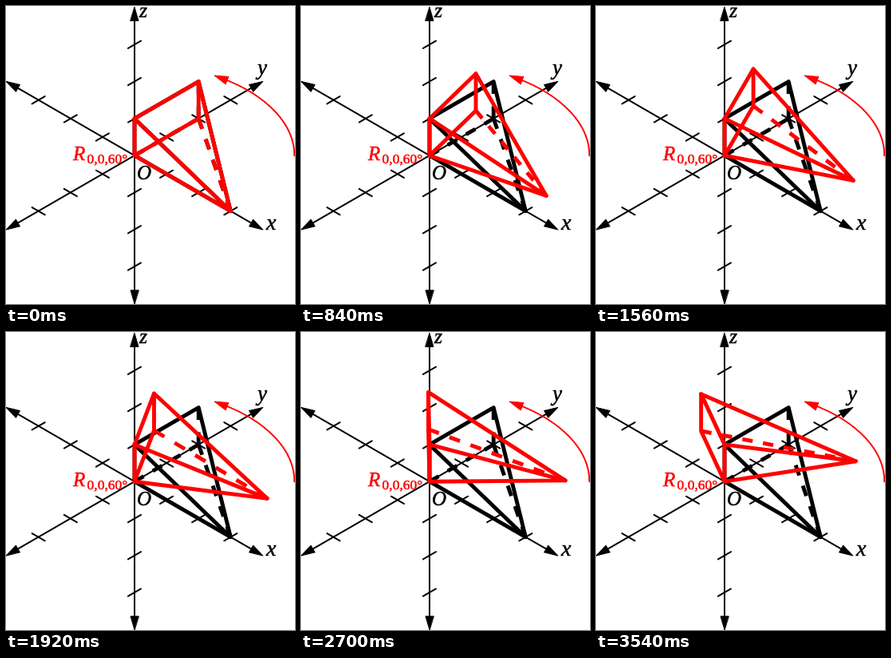
Animation of 362x373 px, one loop 7200 ms. Source, as an HTML page with a canvas:

```html
<!DOCTYPE html>
<html lang="en">
<head>
<meta charset="utf-8">
<style>
html, body { margin: 0; width: 100%; height: 100%; overflow: hidden; background: #fff; }
canvas { display: block; }
</style>
</head>
<body>
<canvas width="362" height="373"></canvas>
<script>
const g = document.querySelector('canvas').getContext('2d');
const LOOP = 7200, STEP = 60, LAST = 59;
const CX = 161, CY = 187.2, UX = 40.1, UY = 23.15, UZ = 46.3;
const RED = '#f00', BLACK = '#000', THIN = 2, THICK = 4.9, DASH = 13.8;
const SERIF = '"Liberation Serif", "Noto Serif", serif';

// isometric projection of a point in space
const project = ([x, y, z]) => [CX + UX * (x + y), CY + UY * (x - y) - UZ * z];

function stroke(points, color, width) {
  g.strokeStyle = color;
  g.lineWidth = width;
  g.beginPath();
  points.forEach(p => g.lineTo(...p));
  g.stroke();
}

// dashes are fitted so that the line begins and ends with a full one
function dashed(a, b, color) {
  const length = Math.hypot(b[0] - a[0], b[1] - a[1]);
  const gaps = Math.round((length / DASH - 1) / 2);
  const dash = length / (2 * gaps + 1);
  g.save();
  g.lineCap = 'butt';
  g.setLineDash([dash, dash]);
  stroke([a, b], color, THICK);
  g.restore();
}

function arrowHead([x, y], angle, color) {
  g.save();
  g.translate(x, y);
  g.rotate(angle);
  g.fillStyle = g.strokeStyle = color;
  g.lineWidth = 1;
  g.beginPath();
  g.moveTo(0, 0);
  g.lineTo(-17, 5);
  g.lineTo(-17, -5);
  g.closePath();
  g.fill();
  g.stroke();
  g.restore();
}

function axis(dir, tickDir) {
  const at = (k, t = 0) => project(dir.map((d, i) => d * k + tickDir[i] * t));
  const a = at(-4.01), b = at(4.01);
  const angle = Math.atan2(b[1] - a[1], b[0] - a[0]);
  stroke([at(-3.8), at(3.8)], BLACK, THIN);
  arrowHead(b, angle, BLACK);
  arrowHead(a, angle + Math.PI, BLACK);
  for (const k of [-3, -2, -1, 1, 2, 3]) stroke([at(k, -0.2), at(k, 0.2)], BLACK, THIN);
}

function text(str, x, y, color, font) {
  g.fillStyle = g.strokeStyle = color;
  g.lineWidth = 0.5;
  g.font = font + ' ' + SERIF;
  g.fillText(str, x, y);
  g.strokeText(str, x, y);
}

// wedge turned about the z axis
function wedge(turn, color, hidden) {
  const c = Math.cos(turn), s = Math.sin(turn);
  const [o, top, tip, foot, peak] =
    [[0, 0, 0], [0, 0, 1], [3, 0, 0], [0, 2, 0], [0, 2, 1]]
      .map(([x, y, z]) => project([x * c - y * s, x * s + y * c, z]));
  dashed(foot, tip, color);
  if (hidden) {
    dashed(o, foot, color);
    dashed(foot, peak, color);
  } else {
    stroke([o, foot, peak], color, THICK);
  }
  stroke([o, top, peak, tip, o], color, THICK);
  stroke([top, tip], color, THICK);
}

function turnArrow() {
  const rx = 200.3, ry = 115.6, end = Math.PI / 3;
  g.strokeStyle = RED;
  g.lineWidth = THIN;
  g.beginPath();
  g.ellipse(CX, CY, rx, ry, 0, 0, -end + 0.05, true);
  g.stroke();
  const head = [CX + rx * Math.cos(end), CY - ry * Math.sin(end)];
  arrowHead(head, Math.atan2(-ry * Math.cos(end), -rx * Math.sin(end)) + 0.05, RED);
}

function draw(ms) {
  const step = Math.min(LAST, Math.floor(ms % LOOP / STEP));
  g.fillStyle = '#fff';
  g.fillRect(0, 0, 362, 373);
  g.lineCap = g.lineJoin = 'round';

  axis([1, 0, 0], [0, 1, 0]);
  axis([0, 1, 0], [1, 0, 0]);
  axis([0, 0, 1], [0, 1, 0]);
  text('x', 326, 280, BLACK, 'italic 28px');
  text('y', 315, 86, BLACK, 'italic 27px');
  text('z', 167, 14, BLACK, 'italic 26px');
  text('O', 164, 217, BLACK, 'italic 25px');
  text('R', 84, 193, RED, 'italic 25px');
  text('0,0,60°', 101.5, 197, RED, '17.5px');
  turnArrow();

  wedge(0, BLACK, true);
  wedge(step / LAST * Math.PI / 3, RED, false);
}

const start = performance.now();
function tick() {
  draw(performance.now() - start);
  requestAnimationFrame(tick);
}
tick();
</script>
</body>
</html>
```
